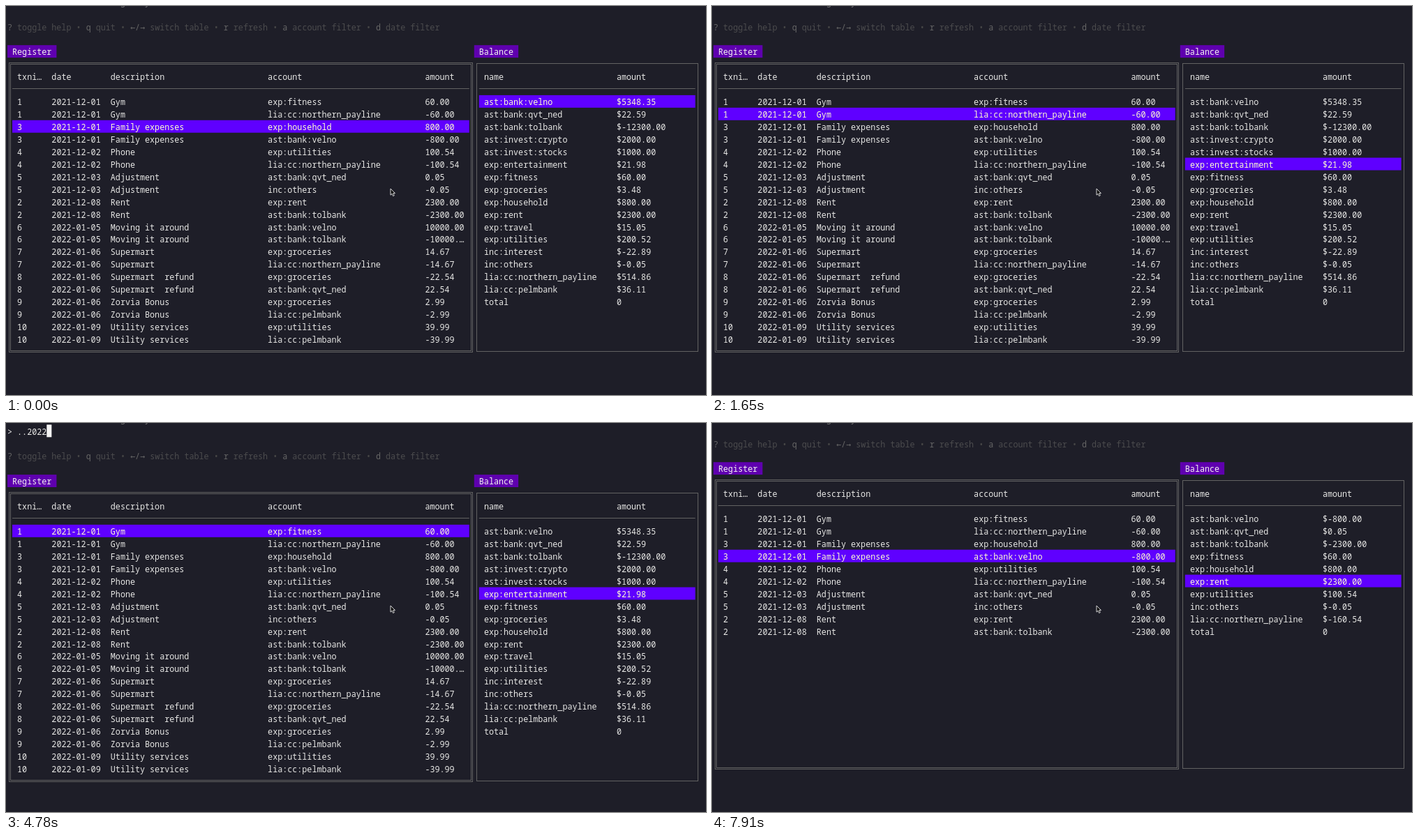
These frames come from a looping animation (1003x558 px, 8 s). An HTML page:

```html
<!DOCTYPE html>
<html>
<head>
<meta charset="utf-8">
<style>
html, body { margin: 0; width: 100%; height: 100%; overflow: hidden; background: #1e1e28; }
svg { display: block; }
text { font: 11.733px "Noto Sans Mono", "DejaVu Sans Mono", monospace; white-space: pre; }
.arrow { font-family: "DejaVu Sans Mono", monospace; }
.title { font-weight: 500; }
</style>
</head>
<body>
<svg id="stage" width="1003" height="558" viewBox="0 0 1003 558"></svg>
<script>
const LOOP = 8000, CELL = 7.04, ROW = 17.94;
const INK = '#e8e8e6', LINE = '#626262', PICK = '#5f00ff', PICK_INK = '#ffffd0', BADGE = '#5f00af';
const CARD = 'lia:cc:northern_payline', MAIN = 'ast:bank:velno',
      SAVE = 'ast:bank:tolbank', SIDE = 'ast:bank:qvt_ned', CREDIT = 'lia:cc:pelmbank';

// id, date, description, debit account, credit account, amount
const transactions = [
  [1, '2021-12-01', 'Gym', 'exp:fitness', CARD, 60],
  [3, '2021-12-01', 'Family expenses', 'exp:household', MAIN, 800],
  [4, '2021-12-02', 'Phone', 'exp:utilities', CARD, 100.54],
  [5, '2021-12-03', 'Adjustment', SIDE, 'inc:others', 0.05],
  [2, '2021-12-08', 'Rent', 'exp:rent', SAVE, 2300],
  [6, '2022-01-05', 'Moving it around', MAIN, SAVE, 10000],
  [7, '2022-01-06', 'Supermart', 'exp:groceries', CARD, 14.67],
  [8, '2022-01-06', 'Supermart  refund', 'exp:groceries', SIDE, -22.54],
  [9, '2022-01-06', 'Zorvia Bonus', 'exp:groceries', CREDIT, 2.99],
  [10, '2022-01-09', 'Utility services', 'exp:utilities', CREDIT, 39.99]
];
const register = transactions.flatMap(([id, date, what, to, from, sum]) => [
  [id, date, what, to, sum.toFixed(2)],
  [id, date, what, from, (-sum).toFixed(2)]
]);

const money = list => [...list.map(([name, n]) => [name, '$' + n.toFixed(2)]), ['total', '0']];
const fullBalance = money([
  [MAIN, 5348.35], [SIDE, 22.59], [SAVE, -12300], ['ast:invest:crypto', 2000],
  ['ast:invest:stocks', 1000], ['exp:entertainment', 21.98], ['exp:fitness', 60],
  ['exp:groceries', 3.48], ['exp:household', 800], ['exp:rent', 2300], ['exp:travel', 15.05],
  ['exp:utilities', 200.52], ['inc:interest', -22.89], ['inc:others', -0.05],
  [CARD, 514.86], [CREDIT, 36.11]
]);
const filteredBalance = money([
  [MAIN, -800], [SIDE, 0.05], [SAVE, -2300], ['exp:fitness', 60], ['exp:household', 800],
  ['exp:rent', 2300], ['exp:utilities', 100.54], ['inc:others', -0.05], [CARD, -160.54]
]);

const QUERY = '..2022-01', HINT = "date filter ('esc' to cancel)";
const HELP = [['?', 'toggle help'], ['q', 'quit'], ['←/→', 'switch table'], ['r', 'refresh'],
  ['a', 'account filter'], ['d', 'date filter']];

// Each event changes part of the state from its time on.
const events = [
  [0, { focus: 0, reg: 2, bal: 0, typed: -1, filtered: false }],
  [150, { focus: 1 }],
  [450, { bal: 1 }], [600, { bal: 2 }], [750, { bal: 3 }], [900, { bal: 4 }], [1050, { bal: 5 }],
  [1350, { focus: 0 }], [1650, { reg: 1 }], [1940, { reg: 0 }],
  [3290, { typed: 0 }],
  ...[4040, 4190, 4340, 4490, 4780, 4930, 5080, 5230].map((t, i) => [t, { typed: i + 2 }]),
  [5530, { typed: -1, filtered: true }],
  [7170, { reg: 1 }], [7620, { reg: 2 }], [7910, { reg: 3 }]
];

const px = col => 2 + col * CELL;
const mid = row => 11.06 + row * ROW;
const cut = (s, w) => s.length > w ? s.slice(0, w - 1) + '…' : s;

function text(col, row, s, fill = INK, style = '') {
  const safe = String(s).replace(/</g, '&lt;').replace(/>/g, '&gt;')
    .replace(/[←→]/g, '<tspan class="arrow">$&</tspan>');
  return `<text class="${style}" x="${px(col)}" y="${mid(row) + 5.5}" fill="${fill}">${safe}</text>`;
}

function bar(col, row, w, fill) {
  const y = mid(row) - ROW / 2 + .25;
  return `<rect x="${px(col)}" y="${y}" width="${w * CELL}" height="${ROW}" fill="${fill}"/>`;
}

function frame(left, top, right, bottom, grow) {
  const snap = v => Math.floor(v) + .5;
  const x = snap(px(left + .5)) - grow, y = snap(mid(top)) - grow;
  const w = snap(px(right + .5)) + grow - x, h = snap(mid(bottom)) + grow - y;
  return `<rect x="${x}" y="${y}" width="${w}" height="${h}" fill="none" stroke="${LINE}"/>`;
}

function table(title, left, right, top, cols, heads, widths, rows, picked, focused) {
  let out = bar(left, top, title.length + 2, BADGE) + text(left + 1, top, title, '#f4f4f0', 'title');
  out += (focused ? [-1, 1] : [0]).map(g => frame(left, top + 1, right, top + 24, g)).join('');
  const y = Math.floor(mid(top + 3)) + .5;
  out += `<path d="M${px(left + 1)} ${y}H${px(right)}" stroke="${LINE}"/>`;
  const line = (cells, row, fill) =>
    cells.map((c, i) => text(cols[i], row, cut(String(c), widths[i]), fill)).join('');
  out += line(heads, top + 2);
  rows.forEach((cells, i) => {
    const on = i === picked;
    if (on) out += bar(left + 1, top + 4 + i, right - left - 1, PICK);
    out += line(cells, top + 4 + i, on ? PICK_INK : INK);
  });
  return out;
}

function prompt(typed) {
  const value = QUERY.slice(0, typed), at = 2 + typed;
  let out = text(0, 0, '>') + text(2, 0, value) + bar(at, 0, 1, '#f4f4f4');
  if (!typed) out += text(2, 0, HINT[0], '#1e1e28') + text(3, 0, HINT.slice(1), '#585858');
  return out;
}

function help(row) {
  let col = 0, out = '';
  HELP.forEach(([key, what], i) => {
    if (i) {
      out += text(col + 1, row, '•', '#464646');
      col += 3;
    }
    out += text(col, row, key, '#666') + text(col + key.length + 1, row, what, '#4c4c4e');
    col += key.length + 1 + what.length;
  });
  return out;
}

function scene(s) {
  const shift = s.typed < 0 ? 0 : 1;
  return text(23, -1, 'g', '#777') + text(28, -1, 'y', '#777') +
    (shift ? prompt(s.typed) : '') +
    help(1 + shift) +
    table('Register', 0, 94, 3 + shift, [2, 9, 21, 53, 85],
      ['txnidx', 'date', 'description', 'account', 'amount'], [5, 10, 30, 30, 8],
      s.filtered ? register.slice(0, 10) : register, s.reg, s.focus === 0) +
    table('Balance', 95, 140, 3 + shift, [97, 124], ['name', 'amount'], [25, 14],
      s.filtered ? filteredBalance : fullBalance, s.bal, s.focus === 1) +
    '<path d="M551 262v9.2l2.1-1.9 1.5 3.3 1.7-.8-1.5-3.2h2.7z" fill="#111" stroke="#e8e8e8" stroke-width=".9"/>';
}

const stage = document.getElementById('stage');
let shown = 0;

function tick() {
  const t = performance.now() % LOOP;
  const past = events.filter(e => e[0] <= t);
  if (past.length !== shown) {
    shown = past.length;
    stage.innerHTML = scene(Object.assign({}, ...past.map(e => e[1])));
  }
  requestAnimationFrame(tick);
}
tick();
</script>
</body>
</html>
```
